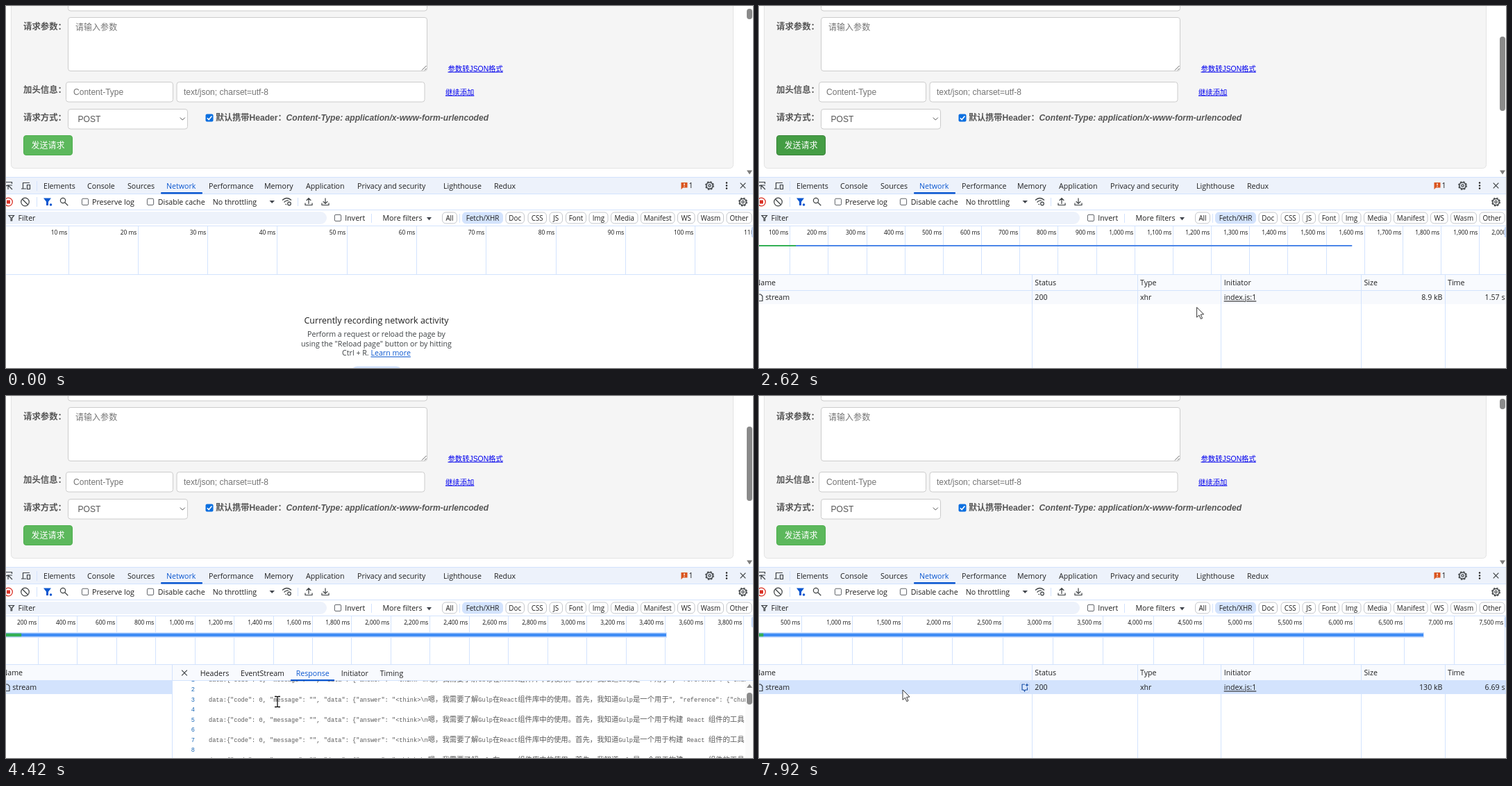
An HTML page for the animation above (7.99 s loop, 1076 px wide and 521 px high).

```html
<!DOCTYPE html>
<html lang="zh">
<head>
<meta charset="utf-8">
<title>Stream request</title>
<style>
html, body { margin: 0; width: 100%; height: 100%; overflow: hidden; background: #fff; }
svg { display: block; width: 1076px; height: 521px; font: 10.65px "Open Sans", "Noto Sans", sans-serif; fill: #1f1f1f; }
text { white-space: pre; }
.doc { font: 12.04px "Liberation Sans", "Noto Sans CJK SC", "Noto Sans CJK", sans-serif; fill: #757575; }
.doc .label { font-size: 12.4px; font-weight: 700; fill: #555; }
.doc .bold { font-size: 12.12px; font-weight: 700; fill: #555; }
.doc .link { font-size: 10.35px; fill: #00e; text-decoration: underline; }
.field { fill: #fff; stroke: #ccc; }
.chip { font-size: 9.9px; text-anchor: middle; }
.tick { font-size: 8.4px; text-anchor: end; fill: #111; }
.mid { text-anchor: middle; }
.end { text-anchor: end; }
.blue { fill: #0b57d0; }
.under { text-decoration: underline; }
.icon { fill: none; stroke: #3c4043; stroke-width: 1.2; }
.rule { stroke: #d3e3fd; fill: none; }
.code { font: 8.63px "Liberation Mono", monospace; fill: #5a5a5a; }
.code .han { font: 10.36px "Noto Sans CJK SC", "Noto Sans CJK", sans-serif; font-weight: 300; }
.code .num { fill: #1967b5; text-anchor: end; }
</style>
</head>
<body>
<svg viewBox="0 0 1076 521" xmlns="http://www.w3.org/2000/svg">
  <defs>
    <clipPath id="body"><rect x="240" y="410" width="825" height="111"/></clipPath>
    <g id="gear"><circle r="4.6" class="icon" style="stroke-width:1.5"/><circle r="5.8" class="icon" stroke-dasharray="2.6 1.955"/><circle r="1.7" class="icon"/></g>
    <path id="cross" class="icon" d="M-3.8-3.8L3.8 3.8M3.8-3.8L-3.8 3.8"/>
    <path id="arrow" d="M0 0V14.3L3.4 11.2L5.8 16.6L8 15.6L5.6 10.4L10 10Z" fill="#fff" stroke="#222" stroke-width=".9"/>
    <path id="beam" d="M-4-7.5H-1.2Q0-7.5 0-6.5Q0-7.5 1.2-7.5H4M0-7V7M-4 7.5H-1.2Q0 7.5 0 6.5Q0 7.5 1.2 7.5H4" fill="none" stroke="#111" stroke-width="1.3"/>
  </defs>
  <g class="doc">
    <rect x="7.5" y="-20" width="1040" height="253.5" rx="5" fill="#f5f5f5" stroke="#e3e3e3"/>
    <rect class="field" x="89.5" y="-25" width="517" height="32" rx="3.5"/>
    <rect class="field" x="89.5" y="16.5" width="517" height="77" rx="3.5"/>
    <path d="M599 92.5L605.5 86M603 92.5L605.5 90" stroke="#666" fill="none"/>
    <rect class="field" x="86.5" y="109.5" width="154" height="28.5" rx="3.5"/>
    <rect class="field" x="246" y="109.5" width="357" height="28.5" rx="3.5"/>
    <rect class="field" x="89.5" y="148.5" width="172" height="28.5" rx="3.5"/>
    <path d="M250.8 160.6L254.3 164.1L257.8 160.6" stroke="#555" fill="none"/>
    <rect x="287.5" y="155.5" width="11" height="11" rx="2" fill="#0b6fe0"/>
    <path d="M289.8 161.2L292.2 163.6L296.4 158.6" stroke="#fff" stroke-width="1.6" fill="none"/>
    <text class="label" x="25" y="33.8">请求参数：</text>
    <text class="label" x="25" y="125.2">加头信息：</text>
    <text class="label" x="25" y="164.8">请求方式：</text>
    <text x="100" y="34.5">请输入参数</text>
    <text x="97" y="127.6">Content-Type</text>
    <text x="256" y="127.6">text/json; charset=utf-8</text>
    <text x="103.5" y="166.8" fill="#555">POST</text>
    <text class="bold" x="302" y="164.8">默认携带Header：<tspan font-style="italic">Content-Type: application/x-www-form-urlencoded</tspan></text>
    <text class="link" x="636.5" y="93.6">参数转JSON格式</text>
    <text class="link" x="633" y="127.6">继续添加</text>
    <rect id="send" x="25.5" y="186.5" width="70" height="28" rx="3.5"/>
    <text x="36.5" y="204.6" fill="#fff">发送请求</text>
    <rect id="thumb" x="1067" width="8" rx="4" fill="#8a8a8a"/>
    <path d="M1067 236.5H1075L1071 242.5Z" fill="#7d7d7d"/>
  </g>
  <g id="tools"></g>
  <g id="live"></g>
</svg>
<script>
const LOOP = 7990;
const $ = id => document.getElementById(id);
const text = (x, y, s, cls = '') => `<text x="${x}" y="${y}" class="${cls}">${s}</text>`;
const rect = (x, y, w, h, fill, more = '') => `<rect x="${x}" y="${y}" width="${w}" height="${h}" fill="${fill}" ${more}/>`;
const path = (d, cls = 'icon', more = '') => `<path d="${d}" class="${cls}" ${more}/>`;
const use = (id, x, y) => `<use href="#${id}" x="${x}" y="${y}"/>`;
const box = (x, y) => rect(x, y, 9.2, 9.2, '#fff', 'rx="1.6" stroke="#5f6368"');

function tabs(list, y, active) {
  return list.map(([x, s]) => text(x, y, s, s === active ? 'blue' : '')).join('');
}

function drawTools() {
  const chips = [[628, 650, 'All'], [657, 716, 'Fetch/XHR'], [719.5, 747, 'Doc'], [751.5, 779, 'CSS'],
    [782.5, 802, 'JS'], [806, 836, 'Font'], [839.5, 867.5, 'Img'], [871, 910.5, 'Media'],
    [914, 963.5, 'Manifest'], [967, 992.5, 'WS'], [996, 1034, 'Wasm'], [1037.5, 1074.5, 'Other']];
  return rect(0, 246, 1076, 275, '#fff') + rect(0, 247, 1076, 23.5, '#edf2fb') +
    path('M0 246.5H1076M0 270.5H1076M0 293.5H1076M0 316.5H1076M44.5 252V266M44.5 275V289M526.5 299V312M653.5 299V312M420.5 276V288', 'rule') +
    // tab strip
    path('M0 253.5H8.5V256M0 259L3 258L9 264M3 258V264M3 258H9') +
    path('M24.5 262.5V254.5H34M22 263H29M30.5 257.5H34.5V263.5H30.5Z') +
    tabs([[54, 'Elements'], [117, 'Console'], [175, 'Sources'], [231, 'Network'], [292, 'Performance'],
      [372, 'Memory'], [432, 'Application'], [506, 'Privacy and security'], [630, 'Lighthouse'], [703, 'Redux']], 263, 'Network') +
    rect(223, 268, 60, 2.4, '#0b57d0', 'rx="1"') +
    path('M972.5 254H981.5V261.5H975L972.5 264Z', '', 'fill="#d9541e"') +
    rect(976.4, 255.2, 1.3, 3, '#fff') + rect(976.4, 259.2, 1.3, 1.2, '#fff') + text(983.5, 262, '1') +
    use('gear', 1013.5, 258.5) + use('cross', 1061.5, 258.5) +
    [254.5, 258.5, 262.5].map(y => `<circle cx="1038" cy="${y}" r="1.2"/>`).join('') +
    // toolbar
    `<circle cx="3.5" cy="282" r="5.8" fill="none" stroke="#d93025" stroke-width="1.3"/>` + rect(1, 279.5, 5, 5, '#d93025') +
    `<circle cx="27.5" cy="282" r="5.8" class="icon"/>` + path('M23.5 278L31.5 286') +
    path('M54 276.5H65L61 281.8V287H58V281.8Z', 'blue') + `<circle cx="64.5" cy="286" r="1.8" class="blue"/>` +
    `<circle cx="82" cy="280" r="3.6" class="icon"/>` + path('M84.8 282.8L89.3 287.2') +
    box(109.4, 277.2) + text(124, 285.7, 'Preserve log') + box(203.4, 277.2) + text(218.7, 285.7, 'Disable cache') +
    text(297.7, 285.7, 'No throttling') + path('M379.5 280H387L383.2 284Z', '', 'fill="#43474e"') +
    path('M398 279.5Q404.5 273.5 411 279.5M400.5 282.5Q404 279 407 280.2M402.5 285L404 286') +
    `<circle cx="408" cy="284.5" r="2.3" class="icon"/>` +
    path('M436 285V277M432.7 280L436 276.7L439.3 280M431 283.5V286.5H441V283.5') +
    path('M460 276.5V284.3M456.7 281.2L460 284.5L463.3 281.2M455 283.5V286.5H465V283.5') + use('gear', 1061.5, 282) +
    // filter row
    rect(-12, 296, 474, 18, '#edf2fb', 'rx="9"') + path('M4 301.5H11.5L8.6 305V309H7V305Z') + text(17.5, 308.8, 'Filter') +
    box(473.4, 300.4) + text(488.3, 308.8, 'Invert') + text(542.5, 308.8, 'More filters') +
    path('M606 304H613L609.5 308.5Z', '', 'fill="#43474e"') +
    chips.map(([a, b, s], i) => rect(a + .5, 297, b - a - 1, 16, i === 1 ? '#d3e3fd' : '#fff', `rx="5" stroke="${i === 1 ? '#d3e3fd' : '#c4c7cc'}"`) +
      text((a + b) / 2, 308.6, s, 'chip')).join('');
}

// Piecewise value at t; points are [time, value, value...]
function track(points, t, ease = u => u) {
  const i = points.findIndex(p => p[0] > t);
  if (i < 0) return points[points.length - 1].slice(1);
  if (i === 0) return points[0].slice(1);
  const a = points[i - 1], b = points[i], u = ease((t - a[0]) / (b[0] - a[0]));
  return a.slice(1).map((v, k) => v + (b[k + 1] - v) * u);
}
const smooth = u => u * u * (3 - 2 * u);

const ELAPSED = [[1005, 0], [1880, 878], [3290, 2190], [4420, 3403], [5250, 4170], [5455, 4170],
  [5465, 4400], [5660, 4620], [6310, 5270], [7700, 6690]];
const SIZE = [[115, .3], [878, 3.1], [2190, 14.2], [4170, 45.9], [5270, 70.8], [6690, 130]];
const POINTER = [[0, 935, 530], [70, 933, 512], [810, 58, 202], [960, 58, 202], [1670, 751, 419], [1880, 751, 419],
  [2410, 660, 436], [2550, 640, 434], [3230, 331, 424], [3360, 331, 424], [4150, 391, 440], [4420, 391, 440],
  [4950, 258, 399], [5120, 258, 399], [5250, 260, 402], [5660, 260, 402], [6310, 282, 408], [6510, 284, 409],
  [7240, 214, 420], [7710, 212, 420], [7860, 212, 420], [7920, 207, 423]];
const START = 1005, OPEN = 3360, CLOSE = 5190, DONE = 7700;

function timeline(ms, started, selected) {
  let scale = 10.033;
  while (ms > .955 * 1086.3 / scale) scale *= .8;
  let step = 1;
  for (let i = 0; step * scale < 55; i++) step *= [2, 2.5, 2][i % 3];
  const at = v => v * scale - 10.33;
  let out = '';
  for (let v = step; at(v) < 1104; v += step) {
    const x = Math.floor(at(v));
    out += path(`M${x + .5} 317V386`, 'rule') + text(x - 1.7, 329.4, v.toLocaleString('en-US') + ' ms', 'tick');
  }
  out += path('M0 386.5H1076', 'rule') + rect(1073.5, 318, 6, 15, '#c9dcfb', 'rx="2"');
  if (!started) return out;
  const y = selected ? 341.6 : 344, h = selected ? 4.6 : 2, end = at(ms), green = Math.min(at(115), end);
  if (selected) out += rect(-11, 340, end + 12, 8, '#d3e3fd');
  return out + rect(-11, y, end + 11, h, selected ? '#3f8cf5' : '#4c86e8') +
    rect(-11, y, Math.max(0, green + 11), h, '#34b055') + rect(-11, y, Math.max(0, Math.min(at(16), end) + 11), h, '#3d8a58');
}

function rowIcon() {
  return rect(376, 412, 13.5, 15, '#d7e5fc', 'rx="3" stroke="#bdd0ef" stroke-width=".8"') +
    path('M383 415H379V423H381.5L382.5 425L383.5 423H386.5V419.5', 'icon', 'style="stroke:#174ea6"') +
    path('M386 413L386.8 415.2L389 416L386.8 416.8L386 419L385.2 416.8L383 416L385.2 415.2Z', '', 'fill="#174ea6"');
}

function table(t, ms, selected, y) {
  const hover = t >= 2500 && y > 410 && y < 429;
  const named = selected && y <= 410;
  const fill = selected ? '#d3e3fd' : hover ? '#f1f1f2' : '#f7f9fd';
  const sec = ms < 1000 ? Math.round(ms) + ' ms' : (ms / 1000).toFixed(2) + ' s';
  const kb = track(SIZE, ms)[0];
  const wait = ms < 115;
  return rect(0, 387, 1076, 23, '#f8fafe') + (named ? rect(0, 387, 393, 23, '#ebebed') : '') +
    rect(0, 410, 1076, 19, fill) + path('M0 409.5H1076M393.5 387V521M545.5 387V521M665.5 387V521M867.5 387V521M988.5 387V521', 'rule') +
    tabs([[-5.8, 'Name'], [397.3, 'Status'], [549, 'Type'], [669.7, 'Initiator'], [871.5, 'Size'], [992, 'Time']], 402.3) +
    fileName() + text(397.3, 423.4, wait ? '(pending)' : '200') + text(549, 423.4, 'xhr') + text(669.7, 423.4, 'index.js:1', 'under') +
    text(984.5, 423.4, (wait ? '0.0' : kb >= 100 ? Math.round(kb) : kb.toFixed(1)) + ' kB', 'end') +
    text(1074.5, 423.4, wait ? 'Pending' : sec, 'end') + (hover ? rowIcon() : '');
}

const fileName = () => path('M0 415H2.5L5 417.5V424.5H0') + text(9.3, 423.4, 'stream');

const HEAD = 'data:{"code": 0, "message": "", "data": {"answer": "&lt;think>\\n嗯，我需要了解Gulp在React组件库中的使用。首先，我知道Gulp是一个用于';
const han = s => s.replace(/[\u3000-\uffff]+/g, m => `<tspan class="han">${m}</tspan>`);
const REPLY = n => han(HEAD + (n < 4 ? '", "reference": {"chunks": []}}}' : '构建 React 组件的工具，它可以帮助"'));

function details(t) {
  const scroll = track([[3950, 0], [4150, 13]], t, smooth)[0];
  let lines = '';
  for (let n = 1; n < 12; n++) {
    const y = (423.5 + (n - 1) * 14.55 - scroll).toFixed(2);
    lines += text(272, y, n, 'num') + (n % 2 ? text(292, y, REPLY(n)) : '');
  }
  return rect(0, 387, 240, 23, '#f8fafe') + rect(0, 410, 239, 19, '#d3e3fd') + text(-5.8, 402.3, 'Name') + fileName() +
    rect(240, 387, 836, 23, '#f8fafe') + path('M0 409.5H1076M239.5 387V521', 'rule') + use('cross', 257, 398.5) +
    tabs([[279.7, 'Headers'], [338, 'EventStream'], [417.7, 'Response'], [482.7, 'Initiator'], [538.7, 'Timing']], 402.6, 'Response') +
    rect(410, 408, 63, 2.3, '#0b57d0') + `<g class="code" clip-path="url(#body)">${lines}</g>` +
    rect(1065, 411, 11, 110, '#fafafa') + path('M1067 420H1075L1071 414.5Z', '', 'fill="#8a8a8a"') +
    rect(1067, 424.4 + scroll * .2, 8, 17, '#8a8a8a', 'rx="4"');
}

function empty() {
  return `<g class="mid"><text x="533.5" y="457.2" font-size="12.5">Currently recording network activity</text>` +
    `<g fill="#3c4043">${text(533.5, 475.8, 'Perform a request or reload the page by')}` +
    text(533.5, 489.8, 'using the "Reload page" button or by hitting') +
    text(533.5, 503.4, 'Ctrl + R. <tspan class="blue under">Learn more</tspan>') + '</g></g>' +
    rect(497, 518.5, 74, 20, '#d3e3fd', 'rx="9"');
}

function pointer(t, x, y) {
  if (t < 70) return '';
  const pressed = (t >= 880 && t < 960) || (t >= 3255 && t < OPEN) || (t >= 5110 && t < CLOSE);
  const beam = t >= 3180 && t < 4680;
  return (pressed ? `<circle cx="${x}" cy="${y}" r="9.7" fill="#fbe93f" fill-opacity=".85"/>` : '') + use(beam ? 'beam' : 'arrow', x, y);
}

let last = '';
function draw(t) {
  const dark = t >= 740 && t < 3255, busy = t >= 960 && t < DONE;
  $('send').setAttribute('fill', dark ? '#449d44' : '#5cb85c');
  $('send').setAttribute('stroke', dark ? '#398439' : '#4cae4c');
  $('thumb').setAttribute('y', busy ? 44 : 4);
  $('thumb').setAttribute('height', busy ? 107 : 15);

  const started = t >= START, selected = t >= OPEN, open = selected && t < CLOSE;
  const ms = track(ELAPSED, t)[0];
  const [x, y] = track(POINTER, t, smooth).map(v => +v.toFixed(1));
  const markup = timeline(ms, started, selected) +
    (!started ? empty() : open ? details(t) : table(t, ms, selected, y)) + pointer(t, x, y);
  if (markup !== last) $('live').innerHTML = last = markup;
}

$('tools').innerHTML = drawTools();
const begin = performance.now();
function frame() {
  draw((performance.now() - begin) % LOOP);
  requestAnimationFrame(frame);
}
frame();
</script>
</body>
</html>
```
